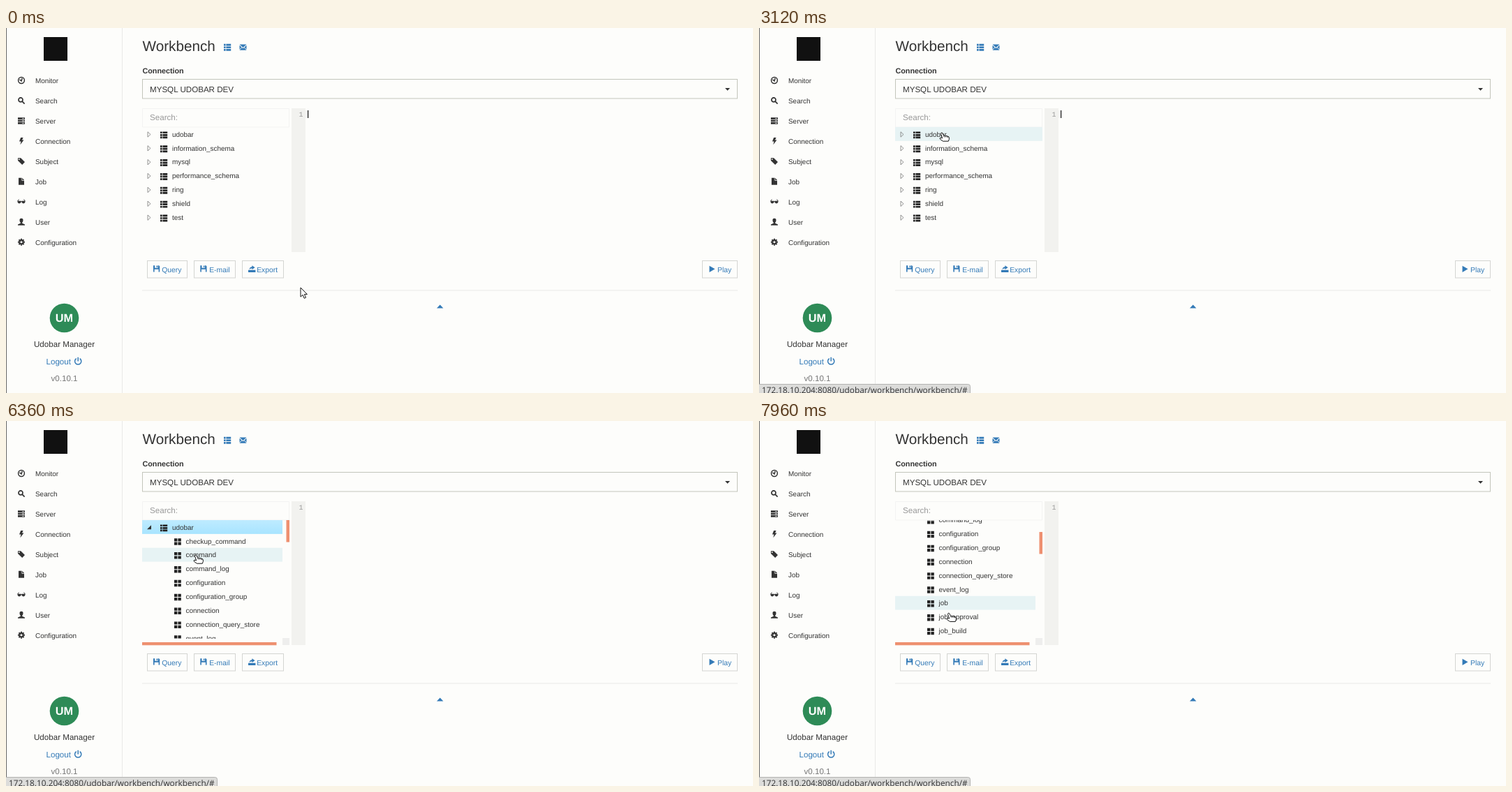
An HTML page for the animation above (8 s loop, 1070 px wide and 523 px high).

```html
<!DOCTYPE html>
<html lang="en">
<head>
<meta charset="utf-8">
<title>Workbench</title>
<style>
  html, body { margin: 0; width: 100%; height: 100%; overflow: hidden; background: #fdfdfb; }
  svg { display: block; width: 100vw; height: 100vh; }
  text { font-family: "Liberation Sans", Arial, sans-serif; fill: #333; text-rendering: geometricPrecision; }
  .link { fill: #337ab7; }
  .box { fill: none; stroke: #d4d5d2; }
  .outline { fill: #fff; stroke: #111; stroke-linejoin: round; }
</style>
</head>
<body>
<svg id="stage" viewBox="0 0 1070 523">
  <defs>
    <linearGradient id="picked" x2="0" y2="1">
      <stop stop-color="#beebff"/><stop offset="1" stop-color="#a8e4ff"/>
    </linearGradient>
    <clipPath id="treeClip"><rect x="195" y="142" width="211" height="170"/></clipPath>
  </defs>
  <rect width="1070" height="523" fill="#fdfdfb"/>
  <rect width="1" height="523" fill="#666"/>
  <rect x="166" width="1" height="523" fill="#e9e9e8"/>
  <rect x="54" y="13" width="34" height="34" fill="#111"/>
  <g id="page"></g>
  <g clip-path="url(#treeClip)">
    <rect id="hover" x="195" height="19.86" fill="#e7f3f4"/>
    <g id="closed"></g>
    <g id="open"></g>
  </g>
  <g id="bars" fill="#ee9070">
    <rect id="thumb" x="401.5" width="4.5" height="31.5"/>
    <rect x="195" y="317" width="192.5" height="4.3"/>
    <rect x="396" y="311" width="10" height="10" fill="#eeeeed"/>
  </g>
  <rect id="caret" x="432" y="118" width="1.2" height="11" fill="#111"/>
  <g id="status">
    <path d="M-1 524V510.5H299.5Q302.5 510.5 302.5 513.5V524Z" fill="#dcdcda" stroke="#b4b4b2"/>
    <text x="4" y="522.6" font-size="11.8" style="font-family:'Open Sans','Noto Sans',sans-serif">172.18.10.204:8080/udobar/workbench/workbench/#</text>
  </g>
  <path id="arrow" class="outline" d="M0 0V13.2L3.1 10.4L5.2 15.3L7.5 14.3L5.4 9.6H9.4Z"/>
  <path id="hand" class="outline" d="M-2.6 2.2Q-2.2.5-.6 1.2L1.8 5.4Q3.4 4.6 4.4 5.6Q6 5 7 6.2Q9 6 9.3 8V10.6L8.3 13.2H.4L-3.6 10.2Q-4.6 8.7-3 8.2L-.4 8.8Z M1.8 5.4L2.5 7.4M4.4 5.6L4.9 7.6M7 6.2L7.3 8"/>
</svg>
<script>
const LOOP = 8000, ROW = 19.86, TOP = 142;
const OPEN_AT = 4480, STATUS_AT = 1780, HOVER_LAG = 60;
const BLINK = 1060, BLINK_SHIFT = 250;

const menu = ["Monitor", "Search", "Server", "Connection", "Subject", "Job", "Log", "User", "Configuration"];
const schemas = ["udobar", "information_schema", "mysql", "performance_schema", "ring", "shield", "test"];
const tables = ["checkup_command", "command", "command_log", "configuration", "configuration_group",
  "connection", "connection_query_store", "event_log", "job", "job_approval", "job_build"];

// Steps of [time, ...values], joined linearly.
const pointerSteps = [[0, 422, 372], [800, 422, 372], [1560, 302, 155], [1740, 263, 149],
  [5700, 263, 149], [6300, 273, 191], [7480, 273, 191], [8000, 273, 281]];
const scrollSteps = [[0, 0], [6740, 0], [6840, 14], [7440, 45], [7960, 70], [8000, 72]];

const $ = id => document.getElementById(id);

function text(x, y, size, content, attrs = "") {
  return `<text x="${x}" y="${y}" font-size="${size}" ${attrs}>${content}</text>`;
}
function shape(d, x, y, attrs = 'fill="#333"') {
  return `<path transform="translate(${x} ${y})" d="${d}" ${attrs}/>`;
}
function stroked(width, color = "#333") {
  return `fill="none" stroke="${color}" stroke-width="${width}"`;
}

const listIcon = [0, 3.6, 7.2].map(y => `M0 ${y}h2.6v2.7h-2.6zM3.4 ${y}h6.8v2.7h-6.8z`).join("");
const gridIcon = "M0 0h4.4v4.2h-4.4zM5.4 0h4.4v4.2h-4.4zM0 5.3h4.4v4.2h-4.4zM5.4 5.3h4.4v4.2h-4.4z";
const mailIcon = "M0 .5H10L5 5ZM0 1.7L3 4.5L0 7.8ZM10 1.7L7 4.5L10 7.8ZM3.5 5L5 6.3L6.5 5L10 8.7H0Z";
const saveIcon = "M0 0H2.2V3.5H6.6V0H8L9.2 1.2V9.2H7.6V5.4H1.6V9.2H0ZM4.6 .3H6V2.8H4.6Z";
const exportIcon = "M0 6.4H10.4V9.6H0ZM1.6 5.6Q2 2.2 5.4 2V0L9.6 3L5.4 5.8V4.2Q3 4.2 1.6 5.6Z";

// Menu icons are drawn around their own centre.
const menuIcons = [
  [["M-4.4 0A4.4 4.4 0 1 1 4.4 0A4.4 4.4 0 1 1-4.4 0M-2.6-1.2L0 1L1.2-3", stroked(1.5)]],
  [["M-4-1A3 3 0 1 1 2-1A3 3 0 1 1-4-1M1.2 1.2L4.6 4.6", stroked(1.7)]],
  [["M-5-4.6H5V-1.9H-5ZM-5-1.2H5V1.4H-5ZM-5 2.1H5V4.8H-5Z"],
   ["M1-3.2H4M1 .1H4M1 3.4H4", stroked(.8, "#fff")]],
  [["M-.8-5H2.6L1-1.3H3.5L-1.6 5.3L-.5 .6H-3Z"]],
  [["M-5-4.6H-.8L5 1.2L1.2 5L-5-1ZM-3.3-3.6A.9.9 0 1 0-3.2-1.8A.9.9 0 1 0-3.3-3.6Z", 'fill="#333" fill-rule="evenodd"']],
  [["M-4-5H.5V-1H4V5H-4ZM1.3-5L4-1.9H1.3Z"]],
  [["M-5.3-.8L-3.6-3.2M5.3-.8L3.6-3.2M-1 0H1", stroked(1)],
   ["M-5.5-1H-.5V.5Q-.8 2.6-3 2.6Q-5.2 2.6-5.5.5ZM.5-1H5.5V.5Q5.2 2.6 3 2.6Q.8 2.6.5.5Z"]],
  [["M0-5Q2.8-5 2.5-1.8Q2.2.4 1.2 1V2L5 3.8V5H-5V3.8L-1.2 2V1Q-2.2.4-2.5-1.8Q-2.8-5 0-5Z"]],
  [["M-2.7 0A2.7 2.7 0 1 1 2.7 0A2.7 2.7 0 1 1-2.7 0", stroked(2.2)],
   ["M0-5V-3.4M0 3.4V5M-5 0H-3.4M3.4 0H5M-3.5-3.5L-2.4-2.4M2.4 2.4L3.5 3.5M-3.5 3.5L-2.4 2.4M2.4-2.4L3.5-3.5", stroked(2)]]
];

function button(x, width, icon, iconX, label, labelX) {
  return `<rect class="box" x="${x + .5}" y="333.5" width="${width}" height="24.5"/>`
    + shape(icon, iconX, 340.3, 'class="link"') + text(labelX, 349.5, 10.35, label, 'class="link"');
}

function buildPage() {
  const middle = 'text-anchor="middle"';
  const items = menu.map((label, i) => {
    const y = 75.3 + i * 28.97;
    return menuIcons[i].map(([d, attrs]) => shape(d, 22, y - .3, attrs)).join("") + text(42, y + 3.7, 9.93, label);
  });
  $("page").innerHTML = items.join("")
    + `<circle cx="83.5" cy="415.5" r="20.8" fill="#2e8b57"/>`
    + text(83.5, 421.2, 16.3, "UM", `${middle} font-weight="bold" style="fill:#fff"`)
    + text(83.5, 456.8, 11.6, "Udobar Manager", middle)
    + text(57.5, 481.5, 11.6, "Logout", 'class="link"')
    + shape("M-2.5-3.7A4.6 4.6 0 1 0 2.5-3.7M0-5.5V.2", 103.2, 477.3, stroked(1.5, "#337ab7"))
    + text(83.5, 506.3, 11.6, "v0.10.1", `${middle} style="fill:#777"`)
    + text(195.5, 33.4, 20.7, "Workbench")
    + shape(listIcon, 312, 22.8, 'class="link"')
    + shape(mailIcon, 334.5, 23, 'class="link"')
    + text(195.5, 65.4, 10.76, "Connection", 'font-weight="bold"')
    + `<rect class="box" x="195.5" y="73.5" width="852" height="27.5" style="stroke:#c3c5bb"/>`
    + text(206, 91.7, 11.6, "MYSQL UDOBAR DEV")
    + shape("M0 0H7L3.5 3.7Z", 1030, 86)
    + `<path d="M195.5 142V115.5H405.5V142Z" fill="none" stroke="#f3f3f2"/>`
    + text(206, 132.2, 11.6, "Search:", 'style="fill:#999"')
    + `<rect x="409" y="115" width="20" height="206" fill="#f2f2ef"/>`
    + text(419.6, 126.8, 10, "1", `style="fill:#999;font-family:'Liberation Mono',monospace"`)
    + button(202, 57, saveIcon, 211, "Query", 223.2)
    + button(269, 59, saveIcon, 278.3, "E-mail", 291.2)
    + button(338, 59, exportIcon, 347, "Export", 359.2)
    + button(997, 50, "M0 .4L8 5L0 9.6Z", 1007.5, "Play", 1019)
    + `<rect x="195" y="375.5" width="853" height="1" fill="#e9e9e8"/>`
    + shape("M0 5H9.4L4.7 0Z", 617, 396.5, 'class="link"');
}

function schemaRow(name, i, expanded) {
  const y = TOP + i * ROW;
  const toggle = expanded ? shape("M0 5.5H6V-.5Z", 202, y + 7.7)
    : shape("M0 0V7.4L4 3.7Z", 203, y + 6.8, stroked(.8, "#777"));
  return toggle + shape(listIcon, 221, y + 6.4, 'fill="#222"') + text(238, y + 13.7, 9.93, name);
}

function tableRow(name, i) {
  const y = TOP + (i + 1) * ROW;
  return shape(gridIcon, 241, y + 6.4, 'fill="#222"') + text(257.5, y + 13.7, 9.93, name);
}

function buildTree() {
  $("closed").innerHTML = schemas.map((name, i) => schemaRow(name, i, false)).join("");
  $("open").innerHTML = `<rect x="195" y="${TOP}" width="201" height="${ROW}" fill="url(#picked)"/>`
    + schemaRow(schemas[0], 0, true) + tables.map(tableRow).join("");
}

function sample(steps, t) {
  const next = Math.max(1, steps.findIndex(step => step[0] > t));
  const [t0, ...from] = steps[next - 1], [t1, ...to] = steps[next];
  const k = (t - t0) / (t1 - t0);
  return from.map((v, i) => v + (to[i] - v) * k);
}

function show(id, visible) {
  $(id).setAttribute("visibility", visible ? "visible" : "hidden");
}

function rowUnder([x, y], scroll, count) {
  const row = Math.floor((y - TOP + scroll) / ROW);
  return x > 195 && x < 406 && y >= TOP && row < count ? row : -1;
}

function render(t) {
  const opened = t >= OPEN_AT;
  const count = opened ? tables.length + 1 : schemas.length;
  const [scroll] = sample(scrollSteps, t);
  const pointer = sample(pointerSteps, t);
  const past = Math.max(0, t - HOVER_LAG);
  const hovered = rowUnder(sample(pointerSteps, past), sample(scrollSteps, past)[0], count);
  const overRow = rowUnder(pointer, scroll, count) >= 0;

  show("closed", !opened);
  show("open", opened);
  show("bars", opened);
  show("status", t >= STATUS_AT);
  show("caret", !opened && (t + BLINK_SHIFT) % BLINK < BLINK / 2);
  show("hover", hovered >= 0);
  show("hand", overRow);
  show("arrow", !overRow);

  $("hover").setAttribute("y", TOP + hovered * ROW - scroll);
  $("hover").setAttribute("width", opened ? 201 : 211);
  $("open").setAttribute("transform", `translate(0 ${-scroll})`);
  $("thumb").setAttribute("y", TOP + scroll * .243);
  for (const id of ["hand", "arrow"]) $(id).setAttribute("transform", `translate(${pointer})`);
}

buildPage();
buildTree();
const start = performance.now();
function frame() {
  render((performance.now() - start) % LOOP);
  requestAnimationFrame(frame);
}
frame();
</script>
</body>
</html>
```
